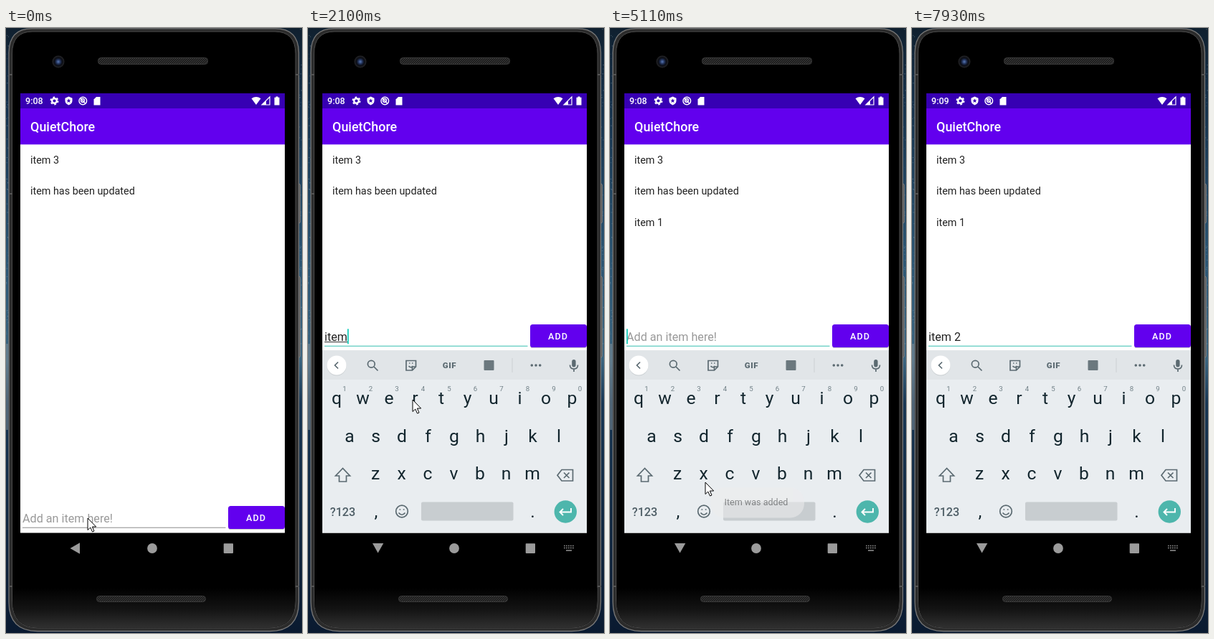
An HTML page for the animation above (8000 ms loop, 413 px wide and 843 px high).

```html
<!DOCTYPE html>
<html lang="en">
<head>
<meta charset="utf-8">
<title>Todo app</title>
<style>
html, body { margin: 0; width: 100%; height: 100%; overflow: hidden; background: #000; }
svg { display: block; width: 413px; height: 843px; font-family: Roboto, sans-serif; }
text { white-space: pre; }
.line { fill: none; stroke: #5b6a71; stroke-width: 1.7; }
.mid { text-anchor: middle; }
</style>
</head>
<body>
<svg viewBox="0 0 413 843" xmlns="http://www.w3.org/2000/svg">
  <defs>
    <linearGradient id="sky" x2="0" y2="1">
      <stop offset="0" stop-color="#10202f"/><stop offset=".12" stop-color="#14304a"/>
      <stop offset=".38" stop-color="#2b5573"/><stop offset=".55" stop-color="#3a647f"/>
      <stop offset=".62" stop-color="#173653"/><stop offset="1" stop-color="#0a1a30"/>
    </linearGradient>
    <linearGradient id="chin" x2="0" y2="1">
      <stop offset="0" stop-color="#000"/><stop offset=".55" stop-color="#141414"/><stop offset="1" stop-color="#303030"/>
    </linearGradient>
    <radialGradient id="lens">
      <stop offset="0" stop-color="#5878b8"/><stop offset=".4" stop-color="#1c2a4c"/>
      <stop offset=".65" stop-color="#0b0d14"/><stop offset="1" stop-color="#262628"/>
    </radialGradient>
    <pattern id="mesh" width="3" height="3" patternUnits="userSpaceOnUse">
      <rect width="3" height="3" fill="#1b1b1b"/><path d="M0 3L3 0" stroke="#444" stroke-width=".9"/>
    </pattern>
  </defs>

  <!-- wallpaper and phone body -->
  <rect width="413" height="843" fill="url(#sky)"/>
  <g id="stars" fill="#9fb4c2"></g>
  <path d="M1.500 440V560" stroke="#87939a" stroke-width="2" opacity=".7"/>
  <g fill="#4e4e4e" stroke="#8b8b8b" stroke-width=".8">
    <rect x="404" y="217" width="6.500" height="55" rx="2"/>
    <rect x="404" y="346" width="6.500" height="113" rx="2"/>
  </g>
  <path d="M4 34Q4.500 .8 36 .8H376Q408 .8 408.500 34V800Q408.500 840.500 368 840.500H44Q4 840.500 4 800Z" fill="#2b2b2b" stroke="#777" stroke-width="1.300"/>
  <path d="M8.500 36Q8.500 5 37 5H375Q404 5 404 36V798Q404 836 367 836H45Q8.500 836 8.500 798Z" fill="#000" stroke="#4a4a4a"/>
  <path d="M9 780H403.500V798Q403.500 835.500 367 835.500H45Q9 835.500 9 798Z" fill="url(#chin)"/>
  <path d="M4 65h5M4 231h5M404 65h5M404 778h5M4 778h5" stroke="#555" stroke-width="2"/>
  <circle cx="73" cy="47" r="8.500" fill="url(#lens)"/>
  <g fill="url(#mesh)" stroke="#3a3a3a">
    <rect x="128.500" y="41.500" width="153" height="9" rx="4"/>
    <rect x="126.500" y="791.500" width="152" height="8" rx="4"/>
  </g>

  <!-- app -->
  <rect x="20" y="92" width="369" height="611.500" fill="#fff"/>
  <rect x="20" y="91" width="369" height="21" fill="#3700b3"/>
  <rect x="20" y="112" width="369" height="50.300" fill="#6200ee"/>
  <g fill="#fff">
    <text id="clock" x="27" y="106.300" font-size="12.570" font-weight="500"></text>
    <circle cx="67.500" cy="101.500" r="3.300" fill="none" stroke="#fff" stroke-width="2.400"/>
    <circle cx="67.500" cy="101.500" r="5.100" fill="none" stroke="#fff" stroke-width="1.800" stroke-dasharray="2.670"/>
    <path d="M87.500 95.500l5 2.200v3.500q0 4.200-5 6.300q-5-2.100-5-6.300v-3.500z"/>
    <path d="M87.500 98.500l1 2h2l-1.600 1.300.6 2.200-2-1.200-2 1.200.6-2.200-1.600-1.300h2z" fill="#3700b3"/>
    <circle cx="107.300" cy="101.500" r="5.300" fill="none" stroke="#fff" stroke-width="1.500"/>
    <circle cx="107" cy="101" r="2.400" fill="none" stroke="#fff" stroke-width="1.500"/>
    <path d="M104 98l6.500 7" stroke="#fff" stroke-width="1.300"/>
    <path d="M126 96h5.500v11.500h-9v-8z"/>
    <path d="M342.500 98.300q6.500-4.600 13 0l-6.500 8.700z"/>
    <path d="M368 96v11h-11z" fill="none" stroke="#fff" stroke-width="1.200"/>
    <path d="M363 101v6h-6z"/>
    <path d="M376.500 95.500h3v1.300h2v10.700h-7v-10.700h2z"/>
    <text x="34" y="144.300" font-size="17.960" font-weight="500">QuietChore</text>
  </g>
  <g font-size="14.370" fill="#222">
    <text x="34" y="189.300">item 3</text>
    <text x="34" y="232.400">item has been updated</text>
    <text id="added" x="34" y="275.500">item 1</text>
  </g>
  <g id="form">
    <text id="field" x="23" font-size="16.160"></text>
    <rect id="composing" x="23" y="437" height="1" fill="#333"/>
    <rect id="rule" x="23" width="283.500"/>
    <rect id="caret" width="1.800" height="21" fill="#16cdbb"/>
    <rect x="310" y="414" width="79" height="32" rx="3.600" fill="#000" opacity=".2"/>
    <rect x="310" y="413" width="79" height="32" rx="3.600" fill="#6200ee"/>
    <text x="335" y="433.800" font-size="12.570" font-weight="500" letter-spacing="1.120" fill="#fff">ADD</text>
  </g>

  <!-- navigation bar -->
  <g fill="#9b9b9b">
    <path id="back"/>
    <circle cx="204" cy="725" r="6.900"/>
    <rect x="303.700" y="718.300" width="13.300" height="13.600" rx=".8"/>
    <g id="switcher" fill="none" stroke="#8b8b8b">
      <path d="M357 721.500h14M357 724.500h14" stroke-width="1.700" stroke-dasharray="1.700 1.300"/>
      <path d="M360 728h8" stroke-width="1.600"/>
    </g>
  </g>

  <!-- keyboard -->
  <g id="kb">
    <rect x="20" y="449" width="369" height="254.500" fill="#e9edf0"/>
    <rect x="20" y="449" width="369" height="41" fill="#e1e5e8"/>
    <circle cx="40" cy="471" r="13.500" fill="#c9ced1"/>
    <circle cx="40" cy="470" r="13.500" fill="#fff"/>
    <path id="chevron" class="line"/>
    <g id="tools">
      <circle cx="88.300" cy="468.300" r="4.900" class="line"/>
      <path d="M92 472l5.500 5.500" class="line"/>
      <path d="M137 463.500h13.500v8.500l-5 5h-8.500zM150.500 472h-5v5M140.500 471q3 3.500 6 0M141 467h1.500M145 467h1.500" class="line"/>
      <text x="197.500" y="474.200" class="mid" font-size="11.500" font-weight="900" letter-spacing=".7" fill="#5b6a71">GIF</text>
      <rect x="245.500" y="463" width="14" height="14" rx="1" fill="#6b787e"/>
      <path d="M285 460v20" stroke="#cbd0d3"/>
      <path d="M312.300 470h.01M318 470h.01M323.700 470h.01" stroke="#5b6a71" stroke-width="3.600" stroke-linecap="round"/>
    </g>
    <g id="words" font-size="16.160" fill="#52646c" class="mid">
      <path d="M149.500 459v22M257.500 459v22" stroke="#c5cacd"/>
      <text x="101" y="475.800"></text><text x="203" y="475.800"></text><text x="305" y="475.800"></text>
    </g>
    <rect x="368.200" y="462" width="5.400" height="10.500" rx="2.700" fill="#5b6a71"/>
    <path d="M365.500 469.500q0 5.500 5.500 5.500t5.500-5.500M371 475v4" class="line"/>
    <g id="keys" class="mid" fill="#13262e" font-size="24.700"></g>
    <path d="M48.500 613.500l-10 10.500h5v8h10v-8h5z" class="line"/>
    <path d="M354 615.500h15.500v15.500h-15.500l-6-7.750zM357 619.500l7.500 7.500M364.500 619.500l-7.500 7.500" class="line"/>
    <text x="48.500" y="679.500" class="mid" font-size="16.200" font-weight="500" fill="#4e5e66">?123</text>
    <circle cx="131" cy="673.500" r="8.300" class="line"/>
    <path d="M126.500 675.500q4.500 5.500 9 0M127.500 671h1.700M132.800 671h1.700" class="line"/>
    <rect x="158" y="660.500" width="128.500" height="26" rx="2" fill="#c8cdd0"/>
    <circle cx="359.300" cy="674" r="15.700" fill="#4db6ac"/>
    <path d="M367 669v5.500h-15M356 670l-4.500 4.500 4.500 4.500" fill="none" stroke="#fff" stroke-width="1.900"/>
  </g>

  <g id="toast">
    <rect x="140" y="640" width="131" height="42.500" rx="20" fill="#ededee"/>
    <text x="159.500" y="665" font-size="12.570" fill="#3d3d3d">Item was added</text>
  </g>
  <path id="mouse" d="M0 0V16.500L3.800 13L6.500 19L9 18L6.400 12H11.700Z" fill="#fff" stroke="#000" stroke-linejoin="round"/>
</svg>
<script>
const $ = id => document.getElementById(id);
const set = (id, attrs) => { for (const k in attrs) $(id).setAttribute(k, attrs[k]); };
const show = (id, on) => set(id, { visibility: on ? "visible" : "hidden" });

let seed = 7;
const rand = () => (seed = seed * 16807 % 2147483647) / 2147483647;
$("stars").innerHTML = Array.from({ length: 120 }, (_, i) =>
  `<rect x="${(i % 2 ? 409 : 0) + rand() * 3}" y="${rand() * 460}" width="1" height="1" opacity="${rand() * .6}"/>`).join("");

const PITCH = 36.5;
const row = (chars, x, y) => [...chars].map((c, i) =>
  `<text x="${x + i * PITCH}" y="${y}">${c}</text>`).join("");
$("keys").innerHTML = row("qwertyuiop", 40, 524.3) + row("asdfghjkl", 58, 576.5) +
  row("zxcvbnm", 94, 629.3) + row(",", 95, 682) + row(".", 313.5, 682) +
  `<g font-size="9.7" fill="#718087">${row("1234567890", 51, 506)}</g>`;

// Each step changes part of the state and holds until the next one.
const STEPS = [
  [0, { clock: "9:08", text: "", focus: 0, caret: 0, kb: 0, slide: 0, words: "", compose: 0,
        newline: 0, added: 0, toast: 0, mouse: [114, 683] }],
  [270, { focus: 1, caret: 1 }],
  [400, { mouse: [120, 681] }],
  [530, { kb: .68, slide: 23 }],
  [650, { kb: .93, slide: 5 }],
  [790, { kb: 1, slide: 0, caret: 0, mouse: [136, 590] }],
  [930, { mouse: [146, 518] }],
  [1200, { caret: 1 }],
  [1670, { caret: 0 }],
  [1950, { text: "it", compose: 1, caret: 1 }],
  [2100, { text: "item" }],
  [2550, { words: "item,items,item's", caret: 0 }],
  [2830, { text: "item ", words: "", compose: 0, caret: 1 }],
  [2980, { text: "item 1" }],
  [3130, { newline: 1 }],
  [3570, { caret: 0 }],
  [3990, { mouse: [384, 455] }],
  [4120, { mouse: [372, 440], caret: 1 }],
  [4250, { mouse: [362, 432], newline: 0 }],
  [4380, { mouse: [358, 430] }],
  [4800, { text: "", added: 1 }],
  [4950, { mouse: [255, 520], toast: .15 }],
  [5110, { mouse: [133, 633], toast: .55 }],
  [5260, { mouse: [108, 560], toast: 1 }],
  [5370, { mouse: [78, 470] }],
  [5500, { mouse: [64, 426], caret: 0 }],
  [5780, { text: "i", compose: 1, caret: 1 }],
  [5930, { text: "it" }],
  [6080, { text: "itm", clock: "9:09" }],
  [6250, { text: "itme", words: "itme,it's,it me" }],
  [6410, { text: "itmee", words: "itmee,it's,it easy" }],
  [6540, { text: "itme" }],
  [6670, { text: "itm", words: "itm,it's,item" }],
  [6830, { text: "it", words: "it,it's,its" }],
  [6970, { text: "ite", words: "ite,item,items" }],
  [7110, { text: "item", words: "item,items,itemized" }],
  [7250, { text: "item ", words: "", compose: 0, toast: .7 }],
  [7390, { text: "item 2", toast: .3 }],
  [7530, { toast: 0 }],
  [7930, { caret: 0, mouse: null }]
];

function draw(s) {
  const open = s.kb > 0, field = $("field");
  $("clock").textContent = s.clock;
  show("added", s.added);
  set("form", { transform: `translate(0 ${open ? 0 : 253})` });
  field.textContent = s.text || "Add an item here!";
  set("field", { fill: s.text ? "#222" : "#999", y: s.newline ? 417 : 436 });
  const width = s.text ? field.getComputedTextLength() : 0;
  show("composing", s.compose);
  set("composing", { width });
  set("rule", { y: s.newline ? 441.5 : 442.7, height: s.newline ? 2 : 1,
                fill: s.focus ? (s.newline ? "#2ed8c8" : "#36bfb0") : "#8a8a8a" });
  show("caret", s.caret);
  set("caret", { x: 23 + (s.newline ? 0 : width), y: s.newline ? 420.5 : 419.3 });
  set("back", { d: open ? "M90 718H105.300L97.600 731.500Z" : "M89.500 725L103 717.300V732.700Z" });
  show("switcher", open);
  set("kb", { opacity: s.kb, transform: `translate(0 ${s.slide})` });
  set("chevron", { d: s.words ? "M38 465.500l4.500 4.500-4.500 4.500" : "M42 465.500l-4.500 4.500 4.500 4.500" });
  show("tools", !s.words);
  show("words", s.words);
  const words = s.words.split(",");
  $("words").querySelectorAll("text").forEach((el, i) => el.textContent = words[i] || "");
  set("toast", { opacity: s.toast });
  show("mouse", s.mouse);
  if (s.mouse) set("mouse", { transform: `translate(${s.mouse})` });
}

const start = performance.now();
let last = -1;
function tick() {
  const t = (performance.now() - start) % 8000;
  const past = STEPS.filter(([at]) => at <= t);
  if (past.length !== last) {
    last = past.length;
    draw(Object.assign({}, ...past.map(([, change]) => change)));
  }
  requestAnimationFrame(tick);
}
tick();
</script>
</body>
</html>
```
